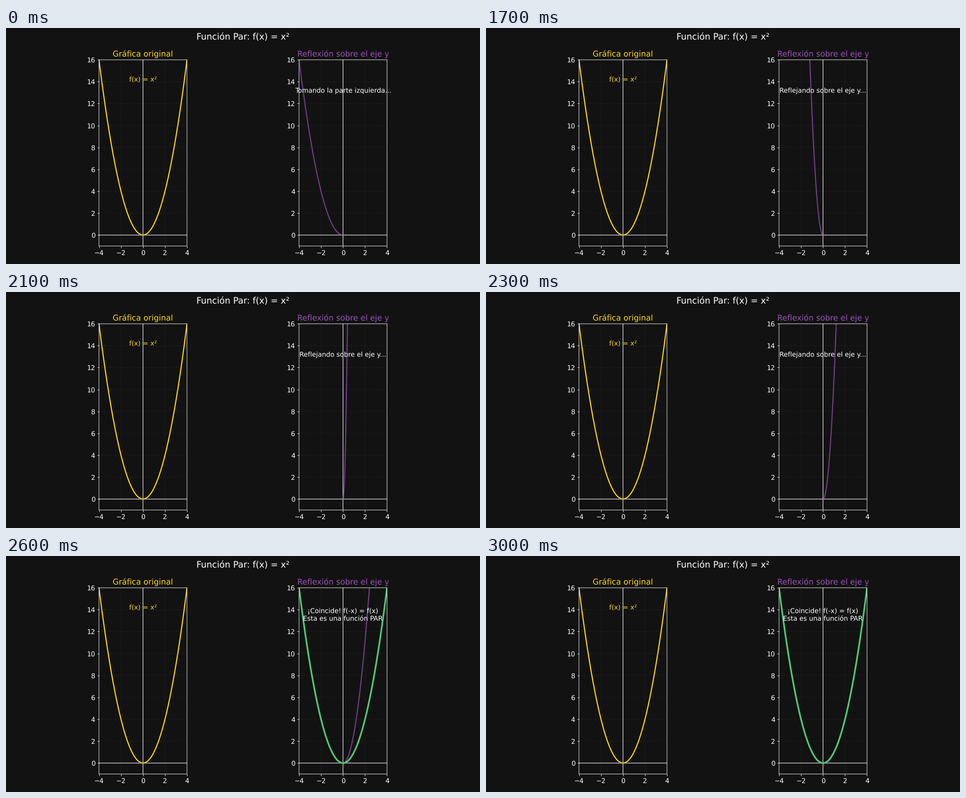
Animation of 1058 by 529 pixels, one loop 4500 ms. Source, as a matplotlib script:

```python
import numpy as np
import matplotlib.pyplot as plt
from matplotlib.animation import FuncAnimation

BG = "#121212"
FG = "white"
YELLOW = "#ffd60a"
PURPLE = "#9b4fb8"
GREEN = "#50c878"

FRAMES, INTERVAL = 45, 100
REFLECT, MATCH = 15, 26
DPI, LAYOUT_DPI = 1058 / 12, 100

plt.rcParams.update({
    "font.family": "DejaVu Sans",
    "font.size": 12,
    "text.color": FG,
    "axes.edgecolor": FG,
    "axes.facecolor": BG,
    "figure.facecolor": BG,
    "xtick.color": FG,
    "ytick.color": FG,
    "path.snap": False,
})

fig, (left, right) = plt.subplots(1, 2, figsize=(12, 6), dpi=DPI)
fig.suptitle("Función Par: f(x) = x²", fontsize=16)


def setup(ax, title, color):
    ax.set_title(title, color=color)
    ax.set_xlim(-4, 4)
    ax.set_ylim(-1, 16)
    ax.set_xticks(range(-4, 5, 2))
    ax.set_yticks(range(0, 17, 2))
    ax.set_aspect("equal")
    ax.grid(color="#444444", linestyle="--", alpha=0.3)
    ax.axhline(0, color=FG, lw=1)
    ax.axvline(0, color=FG, lw=1)


setup(left, "Gráfica original", YELLOW)
setup(right, "Reflexión sobre el eje y", PURPLE)

x = np.linspace(-4, 4, 400)
half = np.linspace(-4, 0, 200)

left.plot(x, x**2, color=YELLOW, lw=2)
left.text(0, 14, "f(x) = x²", color=YELLOW, ha="center")

branch, = right.plot([], [], color=PURPLE, lw=2, alpha=0.7)
match, = right.plot(x, x**2, color=GREEN, lw=3, visible=False)
note = right.text(0, 13, "", ha="center")

# Lay out on a 100 dpi grid, then draw smaller with unhinted glyphs
fig.set_dpi(LAYOUT_DPI)
fig.tight_layout()
fig.set_dpi(DPI)
plt.rcParams["text.hinting"] = "none"


def update(i):
    # The branch holds, then sweeps linearly across the axis to its mirror image
    scale = 1 if i < REFLECT else max(2 - i / 10, -1)
    branch.set_data(half * scale, half**2)
    match.set_visible(i >= MATCH)
    if i < REFLECT:
        note.set_text("Tomando la parte izquierda...")
    elif i < MATCH:
        note.set_text("Reflejando sobre el eje y...")
    else:
        note.set_text("¡Coincide! f(-x) = f(x)\nEsta es una función PAR")
    return branch, match, note


anim = FuncAnimation(fig, update, frames=FRAMES, interval=INTERVAL,
                     repeat=True, repeat_delay=0)
plt.show()
```
